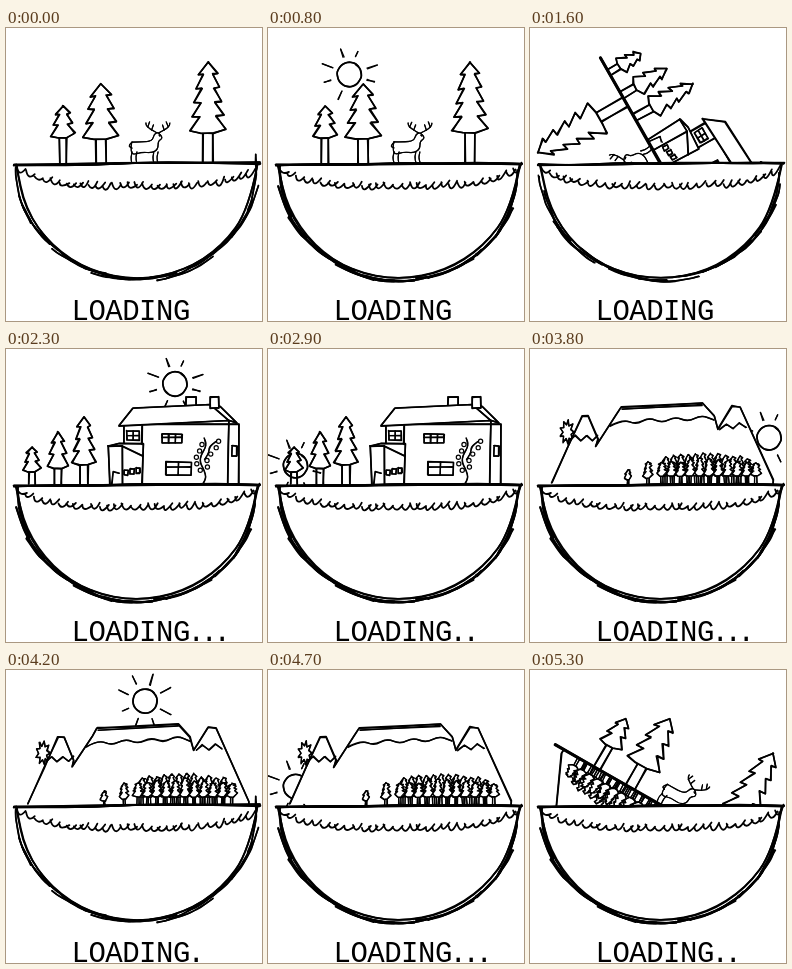
Recreate the animation shown at these times as an HTML page with a canvas. Size 256 by 293 pixels, loop 5400 ms.

```html
<!DOCTYPE html>
<html lang="en">
<head>
<meta charset="utf-8">
<title>Loading</title>
<style>
  html, body { margin: 0; width: 100%; height: 100%; overflow: hidden; background: #fff; }
  canvas, svg { position: absolute; left: 0; top: 0; width: 256px; height: 293px; }
  text { font: 29px "Liberation Mono", monospace; letter-spacing: -.5px; }
  #dots { letter-spacing: -4.4px; }
</style>
</head>
<body>
<canvas id="stage" width="256" height="293"></canvas>
<svg viewBox="0 0 256 293"><text x="65.5" y="291.5">LOADING</text><text id="dots" x="181.5" y="291.5"></text></svg>
<script>
const ctx = document.getElementById('stage').getContext('2d');
const dots = document.getElementById('dots');
const STEP = 100, SCENE = 18, TOTAL = 54;
const SUN_STEPS = 12, TURN = Math.PI / 6;
const PX = 131, PY = 135.5, GROUND = 135;

let seed = 1;
const rnd = () => (seed = (seed * 16807) % 2147483647) / 2147483647;
const wob = a => (rnd() * 2 - 1) * a;
const parse = s => s.split(' ').map(p => p.split(',').map(Number));
const sample = (n, f) => Array.from({ length: n + 1 }, (_, i) => f(i / n, i));

// Sketchy stroke: the same path gone over twice with a shaky hand
function ink(path, { w = 1.6, fill = false, smooth = false, j = 0.55 } = {}) {
  const pts = typeof path === 'string' ? parse(path) : path;
  ctx.lineWidth = w;
  for (let pass = 0; pass < 2; pass++) {
    const p = pts.map(([x, y]) => [x + wob(j), y + wob(j)]);
    ctx.beginPath();
    ctx.moveTo(...p[0]);
    for (let i = 1; i < p.length; i++) {
      const a = p[i], b = p[i + 1];
      if (smooth && b) ctx.quadraticCurveTo(...a, (a[0] + b[0]) / 2, (a[1] + b[1]) / 2);
      else ctx.lineTo(...a);
    }
    if (fill && !pass) ctx.fill();
    ctx.stroke();
  }
}

const line = (x0, y0, x1, y1, o) => ink([[x0, y0], [x1, y1]], o);
const box = (x, y, w, h, o) => ink([[x, y], [x + w, y], [x + w, y + h], [x, y + h], [x, y]], o);

function panes(x, y, w, h, cols, bar) {
  box(x, y, w, h, { w: 1.4 });
  for (let i = 1; i < cols; i++) line(x + w * i / cols, y, x + w * i / cols, y + h, { w: 1.3 });
  if (bar) line(x, y + h * bar, x + w, y + h * bar, { w: 1.3 });
}

// Branches sweep out to a tip, then cut back towards the trunk
function tree(x, tip, base, half, tiers, trunk, w = 1.6) {
  const left = [], right = [];
  for (let i = 1; i <= tiers; i++) {
    const y = tip + (base - tip) * i / tiers, r = half * (0.42 + 0.58 * i / tiers);
    left.push([x - r, y - 1 + wob(1)]);
    right.unshift([x + r, y - 3 + wob(1)]);
    if (i < tiers) {
      left.push([x - r * 0.52, y - 1.5]);
      right.unshift([x + r * 0.5, y - 2]);
    }
  }
  for (const s of [-1, 1]) line(x + s * trunk, base, x + s * trunk, GROUND, { w });
  ink([[x, tip], ...left, [x - half * 0.4, base + 1], [x + half * 0.3, base + 1], ...right, [x, tip]], { w, fill: true });
}

function deer() {
  const o = { w: 1.1, smooth: true, j: 0.3 };
  ink('126,114 135,114 146,113 148,106 152,104 157,110 152,113 152,121 146,125 136,124 126,127 125,119 126,114', { ...o, fill: true });
  ink('126,114 122,118 126,120', o);
  for (const x of [126, 131, 148, 152])
    ink([[x, 124], [x - 1.5, 129], [x, GROUND]], o);
  for (const s of [-1, 1]) {
    const branch = t => [152 + s * (1 + 11 * Math.sin(t * 1.7)), 105 - 10 * t];
    ink(sample(5, branch), o);
    for (const t of [0.3, 0.6]) {
      const [x, y] = branch(t);
      line(x, y, x - s * 2, y - 5, o);
    }
  }
  line(153, 107, 154, 108, o);
}

function forest() {
  tree(57, 78, 109, 12, 3, 3.5);
  tree(95, 56, 110, 18, 4, 5);
  tree(202, 34, 104, 18, 5, 5);
  deer();
}

function house() {
  for (let i = 0; i < 3; i++) tree(26 + 26 * i, 98 - 15 * i, 122 - 3.5 * i, 9 + 1.5 * i, 3 + (i > 1), 3 + i / 2);
  box(180, 48, 10, 10, { fill: true });
  box(118, 75, 115, 60, { fill: true });
  ink('113,77 127,59 205,55 214,57 231,74 223,72 113,77', { fill: true });
  ink('205,56 223,72 222,98 222,135');
  box(204, 48, 9, 11, { fill: true });
  ink('104,135 102,97 113,94 137,95 136,135', { fill: true });
  line(136, 77, 136, 95);
  ink('102,97 116,97 137,107');
  line(116, 97, 116, GROUND);
  ink('113,124 107,123 106,135', { w: 1.3 });
  panes(121, 82, 12, 9, 2, 0.5);
  panes(156, 85, 20, 9, 3, 0.35);
  panes(160, 113, 25, 13, 2, 0.4);
  panes(226, 97, 5, 10, 1);
  for (let i = 0; i < 3; i++) panes(118 + 6 * i, 121 - i, 4, 5, 1);
  // climbing plant
  const vine = t => [197 + 3 * Math.sin(t * 9), GROUND - 46 * t];
  ink(sample(9, vine), { w: 1.3, smooth: true });
  ink('198,111 203,104 203,98 210,92', { w: 1.2, smooth: true });
  for (let i = 0; i < 10; i++) {
    const [x, y] = vine(0.3 + i * 0.07), out = i % 2 ? 4 + i : -4;
    ctx.beginPath();
    ctx.arc(x + out, y, 2.1, 0, 7);
    ctx.fill();
    ctx.stroke();
  }
}

// Wavy or jagged edge of a snow cap
const snow = (x0, y0, x1, y1, n, amp, smooth) =>
  ink(sample(n, (t, i) => [x0 + (x1 - x0) * t, y0 + (y1 - y0) * t + (i % 2 ? -amp : amp)]), { smooth, w: 1.4 });

function mountain() {
  ink(sample(18, (t, i) => {
    const a = t * 2 * Math.PI, r = i % 2 ? 7 : 12;
    return [37 + r * 0.6 * Math.cos(a), 83 + r * Math.sin(a)];
  }), { w: 1.3 });
  ink('22,134 38,98 52,67 58,67 68,90 66,97 86,66 91,58 119,57 172,54 184,67 188,80 202,57 210,58 243,131 243,135', { fill: true });
  line(92, 60, 172, 56, { w: 1.3 });
  snow(80, 74, 184, 68, 8, 3, true);
  snow(40, 89, 68, 89, 5, 2.5);
  snow(190, 78, 216, 76, 4, 2.5);
  tree(98, 121, 130, 3.5, 3, 0.8, 1.2);
  tree(118, 113, 128, 5, 4, 1, 1.2);
  for (const [n, x, gap, top] of [[12, 136, 7.4, 103], [11, 132, 9.4, 109]])
    for (let i = 0; i < n; i++)
      tree(x + i * gap, top + Math.abs(i - 5) + wob(1.5), 126, 5.5, 4, 1, 1.2);
}

const scenes = [forest, house, mountain];

function sun(step) {
  const a = step * Math.PI / SUN_STEPS;
  const x = 139 + 115.5 * Math.cos(a), y = 146.5 - 115.5 * Math.sin(a);
  const at = (r, t) => [x + r * Math.cos(t), y + r * Math.sin(t)];
  ink(sample(22, t => at(12.2, t * 6.6 - 1)), { smooth: true, fill: true, j: 0.4 });
  for (let i = 0; i < 8; i++) {
    const t = (i + 0.5) * Math.PI / 4 + wob(0.12);
    ink([at(18 + wob(1.5), t), at(27 + wob(2.5), t)], { w: 1.3 });
  }
}

function arc(from, to, off0, off1, w) {
  ink(sample(8, t => {
    const a = from + (to - from) * t, o = off0 + (off1 - off0) * t;
    return [131 + (121 + o) * Math.cos(a), 137 + (115 + o) * Math.sin(a)];
  }), { w, smooth: true, j: 0.7 });
}

function bowl(boil) {
  arc(0, Math.PI, 0, 0, 1.8);
  for (let i = 0; i < 14; i++) {
    const a = i * 0.2 + wob(0.1);
    arc(a, Math.min(a + 0.5, Math.PI), wob(2.4), wob(2.4), boil === 2 ? 2 : 1.6);
  }
  for (let i = 0; i < 3; i++)
    ink(sample(6, t => [8 + 246 * t, 137 - 1.8 * Math.sin(t * 2) + wob(1)]), { w: 1.7, smooth: true });
  // grass fringe
  const edge = x => 140 + 17 * (1 - Math.abs((x - 131) / 120) ** 4);
  ctx.lineWidth = 1.8;
  ctx.beginPath();
  for (let x = 11; x < 246; x += 6.5 + rnd() * 3) {
    const end = x + 8 + rnd() * 2;
    ctx.moveTo(x, edge(x) - 1 + wob(2));
    ctx.quadraticCurveTo(x + 2 + wob(2), edge(x) + 8 + wob(2), end, edge(end) - 2 + wob(2));
  }
  ctx.stroke();
}

function draw(n) {
  const boil = n % 3, phase = n % SCENE, index = Math.floor(n / SCENE);
  const turn = Math.max(0, phase - SUN_STEPS) * TURN;
  const show = (k, angle) => {
    seed = 4001 + boil * 977 + k * 131;
    ctx.save();
    ctx.translate(PX, PY);
    ctx.rotate(angle);
    ctx.translate(-PX, -PY);
    scenes[k]();
    ctx.restore();
  };
  ctx.fillStyle = '#fff';
  ctx.strokeStyle = '#000';
  ctx.lineCap = ctx.lineJoin = 'round';
  ctx.fillRect(0, 0, 256, 293);
  ctx.save();
  ctx.beginPath();
  ctx.rect(0, 0, 256, 136);
  ctx.clip();
  seed = 71 + boil * 13;
  if (phase > 0 && phase < SUN_STEPS) sun(phase);
  show(index, -turn);
  if (turn) {
    show((index + 1) % scenes.length, Math.PI - turn);
    line(PX, PY, PX + 122 * Math.cos(turn), PY - 122 * Math.sin(turn), { w: 2.8 });
  }
  ctx.restore();
  seed = 509 + boil * 7919;
  bowl(boil);
  dots.textContent = '.'.repeat(Math.floor(n % 8 / 2));
}

let last = -1;
const start = performance.now();
function tick() {
  const n = Math.floor((performance.now() - start) / STEP) % TOTAL;
  if (n !== last) draw(last = n);
  requestAnimationFrame(tick);
}
tick();
</script>
</body>
</html>
```
